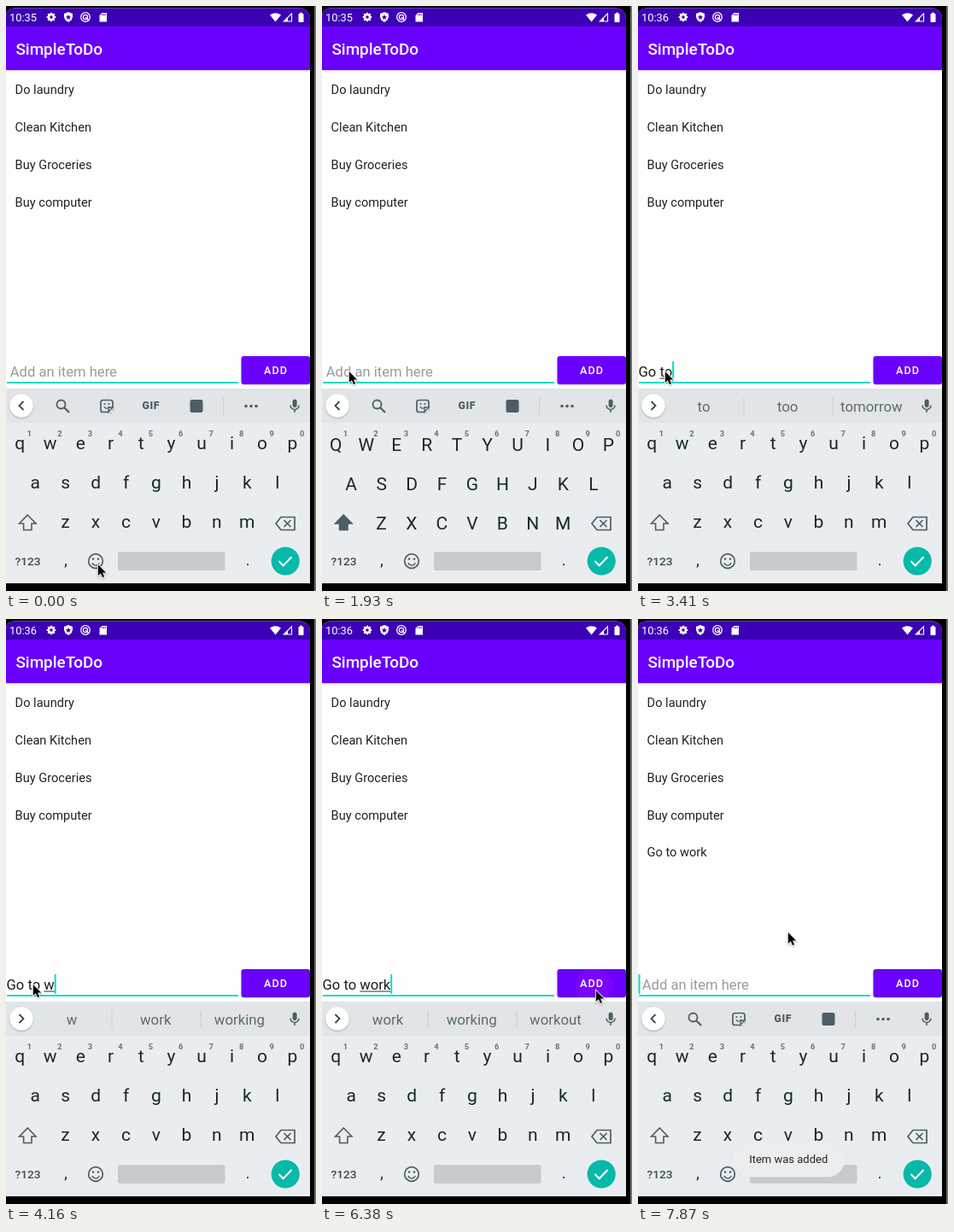
These frames come from a looping animation (363x685 px, 8000 ms). An HTML page with a canvas:

```html
<!DOCTYPE html>
<html lang="en">
<head>
<meta charset="utf-8">
<title>To-do list</title>
<style>
html, body { margin: 0; width: 100%; height: 100%; overflow: hidden; background: #000; }
canvas { display: block; width: 363px; height: 685px; }
</style>
</head>
<body>
<canvas id="stage"></canvas>
<script>
const W = 363, H = 685, LOOP = 8000, TICK = 148.5;
const canvas = document.getElementById('stage');
const dpr = window.devicePixelRatio || 1;
canvas.width = W * dpr;
canvas.height = H * dpr;
const ctx = canvas.getContext('2d');

const PURPLE = '#6900fe', TEAL = '#0fdac8', ICON = '#4d5d65', INK = '#17282f';
const ITEMS = ['Do laundry', 'Clean Kitchen', 'Buy Groceries', 'Buy computer'];

// [tick, typed text, start of the underlined word, suggestions]
const TYPING = [
  [0, '', 0, null],
  [14, 'G', 0, 'G|Good|Go'],
  [19, 'Go', 0, 'Go|Good|Going'],
  [21, 'Go ', 3, 'to|back|for'],
  [23, 'Go to', 3, 'to|too|tomorrow'],
  [24, 'Go to ', 6, 'the|bed|sleep'],
  [28, 'Go to w', 6, 'w|work|working'],
  [32, 'Go to wo', 6, 'wo|work|working'],
  [34, 'Go to wor', 6, 'wor|work|working'],
  [36, 'Go to work', 6, 'work|working|workout'],
  [45, '', 0, 'work|working|workout'],
  [46, '', 0, '||'],
  [47, '', 0, null]
];
// Ticks at which the caret flips, hidden at first
const BLINKS = [3, 6, 9, 13, 14, 17, 19, 27, 28, 31, 32, 39, 42, 48, 50];
// Pointer stops: [tick, x, y]
const POINTER = [
  [0, 107, 653], [5, 31, 427], [37, 31, 427], [40, 300, 432], [41, 348, 432],
  [42, 326, 434], [43, 320, 434], [51, 320, 434], [53, 175, 366]
];

function text(s, x, y, size, color, { weight = 400, align = 'left', spacing = 0 } = {}) {
  ctx.font = `${weight} ${size}px Roboto, sans-serif`;
  ctx.textAlign = align;
  ctx.letterSpacing = spacing + 'px';
  ctx.fillStyle = color;
  ctx.fillText(s, x, y);
}

function rect(x, y, w, h, color, radius = 0) {
  ctx.fillStyle = color;
  ctx.beginPath();
  ctx.roundRect(x, y, w, h, radius);
  ctx.fill();
}

function disc(x, y, r, color) {
  ctx.fillStyle = color;
  ctx.beginPath();
  ctx.arc(x, y, r, 0, 7);
  ctx.fill();
}

function ring(x, y, r, color, width, from = 0, to = 2 * Math.PI) {
  ctx.strokeStyle = color;
  ctx.lineWidth = width;
  ctx.beginPath();
  ctx.arc(x, y, r, from, to);
  ctx.stroke();
}

function trace(points, closed) {
  ctx.beginPath();
  for (let i = 0; i < points.length; i += 2) ctx.lineTo(points[i], points[i + 1]);
  if (closed) ctx.closePath();
}

function line(points, color, width, closed = false) {
  trace(points, closed);
  ctx.strokeStyle = color;
  ctx.lineWidth = width;
  ctx.stroke();
}

function poly(points, color) {
  trace(points, true);
  ctx.fillStyle = color;
  ctx.fill();
}

function shadow(color, blur, dy, draw) {
  ctx.save();
  ctx.shadowColor = color;
  ctx.shadowBlur = blur * dpr;
  ctx.shadowOffsetY = dy * dpr;
  draw();
  ctx.restore();
}

function statusBar(k) {
  const bar = '#3d00b6', white = '#fff';
  rect(0, 1, 356, 23, bar);
  text(k < 20 ? '10:35' : '10:36', 4, 18, 12.9, white);
  // gear
  for (let i = 0; i < 4; i++) {
    const a = i * Math.PI / 4, c = 5.3 * Math.cos(a), s = 5.3 * Math.sin(a);
    line([53 - c, 13 - s, 53 + c, 13 + s], white, 2.2);
  }
  disc(53, 13, 4.2, white);
  disc(53, 13, 1.8, bar);
  // shield
  poly([73, 7, 78, 9, 78, 13, 76.5, 16.5, 73, 19, 69.5, 16.5, 68, 13, 68, 9], white);
  poly([73, 10, 74, 12, 76, 12.3, 74.5, 13.7, 75, 16, 73, 14.8, 71, 16, 71.5, 13.7, 70, 12.3, 72, 12], bar);
  // sync circle
  ring(93, 13, 5.3, white, 1.3);
  ring(93, 13, 2.6, white, 1.2);
  line([93, 13, 97, 17], white, 1.3);
  // memory card
  poly([112.5, 8, 118, 8, 118, 18.5, 109.5, 18.5, 109.5, 11], white);
  for (let i = 0; i < 3; i++) rect(112.2 + i * 1.8, 9.3, 0.9, 2, bar);
  // wifi, signal, battery
  ctx.fillStyle = white;
  ctx.beginPath();
  ctx.moveTo(315.5, 18.5);
  ctx.lineTo(309, 10.5);
  ctx.quadraticCurveTo(315.5, 5.8, 322, 10.5);
  ctx.fill();
  line([334.5, 8.8, 334.5, 18, 325.3, 18], white, 1.1, true);
  poly([330, 13.3, 330, 18, 325.3, 18], white);
  rect(342.5, 9, 6, 10, white, 0.8);
  rect(344, 7.7, 3, 2, white);
}

function list(k) {
  ITEMS.forEach((s, i) => text(s, 10.6, 102.7 + 44 * i, 14.6, '#222'));
  if (k >= 46) text('Go to work', 10.6, 278.3, 14.6, k > 46 ? '#222' : '#4a4a4a');
}

function input(k, typed, start) {
  const x = 0.5, size = 16.6;
  rect(1, 440, 271, 2, TEAL);
  if (!typed) text('Add an item here', 4.8, 434, size, '#9b9b9b');
  text(typed, x, 434, size, '#1c1c1c');
  const end = x + ctx.measureText(typed).width;
  const from = x + ctx.measureText(typed.slice(0, start)).width;
  if (end - from > 1) rect(from, 435.4, end - from, 1.1, '#333');
  if (BLINKS.filter(b => b <= k).length % 2) rect(end, 416, 2, 23, TEAL);
}

function button(k) {
  shadow('rgba(0,0,0,.2)', 2, 1, () => rect(275.5, 410, 80.5, 33, PURPLE, 3));
  if (k >= 43 && k < 48) {
    ctx.save();
    ctx.beginPath();
    ctx.roundRect(275.5, 410, 80.5, 33, 3);
    ctx.clip();
    disc(319, 430, 22 + (k - 43) * 20, k < 47 ? '#7a04ff' : '#7102ff');
    ctx.restore();
  }
  text('ADD', 302, 431.3, 12.6, '#fff', { weight: 500, spacing: 1.1 });
}

function tools() {
  ring(64.5, 466.5, 5, ICON, 1.8);
  line([68, 470, 74, 476], ICON, 2.2);
  // sticker
  ctx.beginPath();
  ctx.roundRect(111, 461.5, 14, 14, 2.5);
  ctx.strokeStyle = ICON;
  ctx.lineWidth = 1.7;
  ctx.stroke();
  poly([125.5, 470, 119.5, 476, 125.5, 476], '#e1e5e8');
  line([125, 470, 120, 470, 120, 475.3], ICON, 1.3, true);
  disc(115.5, 466, 1.1, ICON);
  disc(120.5, 466, 1.1, ICON);
  ring(118, 468, 3.2, ICON, 1.2, 0.3, 2.8);
  text('GIF', 169.8, 472.4, 12.2, ICON, { weight: 800, align: 'center', spacing: 0.6 });
  rect(215.5, 461, 15, 15, ICON, 2);
  rect(254, 458, 1, 21, '#ccd1d5');
  for (let i = -1; i < 2; i++) disc(287 + i * 6, 468.5, 1.8, ICON);
}

function suggestions(words) {
  words.forEach((w, i) => text(w, 77 + 98.2 * i, 475, 16.8, '#5b6a71', { align: 'center' }));
  if (words[0]) for (const x of [123.5, 227.5]) rect(x, 458, 1, 21, '#c9cfd3');
}

function strip(words) {
  rect(0, 448, 356, 41, '#e1e5e8');
  shadow('rgba(0,0,0,.25)', 2, 1, () => disc(18, 468, 13.7, '#fff'));
  const d = words ? 1 : -1;
  line([18 - 2.5 * d, 463, 18 + 2.5 * d, 468, 18 - 2.5 * d, 473], '#37474f', 1.8);
  if (words) suggestions(words.split('|'));
  else tools();
  // microphone
  rect(335.6, 460.5, 5, 9.5, ICON, 2.5);
  ring(338, 467.5, 5, ICON, 1.5, 0, Math.PI);
  line([338, 472.5, 338, 476], ICON, 1.6);
}

function keys(upper) {
  rect(0, 488, 356, 188, '#e9edf0');
  const rows = [['qwertyuiop', 16.3], ['asdfghjkl', 34.2], ['zxcvbnm', 69.5]];
  rows.forEach(([letters, x0], r) => [...letters].forEach((c, i) => {
    const x = x0 + 35.45 * i;
    text(upper ? c.toUpperCase() : c, x, (upper ? 521 : 518.6) + 46 * r, 21, INK, { align: 'center' });
    if (!r) text((i + 1) % 10, x + 11.2, 504.3, 9.3, '#66747b', { weight: 700, align: 'center' });
  }));
  const shift = [25.3, 596, 35, 606, 30, 606, 30, 613.5, 20.6, 613.5, 20.6, 606, 15.6, 606];
  if (upper) poly(shift, ICON);
  line(shift, ICON, 1.6, true);
  line([316, 606, 322, 598.5, 338, 598.5, 338, 613.5, 322, 613.5], ICON, 1.7, true);
  line([325.5, 602, 333.5, 610], ICON, 1.7);
  line([333.5, 602, 325.5, 610], ICON, 1.7);
  text('?123', 25.5, 655, 13.7, '#3c4b52', { weight: 500, align: 'center' });
  text(',', 70, 655, 18, INK, { align: 'center' });
  text('.', 283, 655, 18, INK, { align: 'center' });
  // emoji
  ring(105, 650, 8.3, ICON, 1.7);
  disc(102, 647.5, 1.3, ICON);
  disc(108, 647.5, 1.3, ICON);
  ring(105, 650.5, 4.4, ICON, 1.5, 0.35, Math.PI - 0.35);
  rect(131, 639.3, 125.5, 21.7, '#c6cbcf', 2);
  disc(327.2, 650, 16.6, '#07b9a9');
  line([319.5, 650, 324.7, 655.2, 334.5, 645], '#fff', 2.1);
}

function toast(k) {
  if (k < 46) return;
  ctx.save();
  ctx.globalAlpha = [0.35, 0.85][k - 46] || 1;
  shadow('rgba(0,0,0,.05)', 3, 0, () => rect(109.5, 611, 133, 42.5, '#ecedee', 21));
  text('Item was added', 176.2, 637, 13, '#262626', { align: 'center' });
  ctx.restore();
}

function pointer(k) {
  const n = POINTER.findIndex(p => p[0] > k);
  const b = POINTER[n < 0 ? POINTER.length - 1 : n];
  const a = n < 0 ? b : POINTER[n - 1];
  const u = a === b ? 0 : (k - a[0]) / (b[0] - a[0]);
  const ease = u * u * (3 - 2 * u);
  const x = a[1] + (b[1] - a[1]) * ease, y = a[2] + (b[2] - a[2]) * ease;
  ctx.save();
  ctx.translate(x + 0.8, y + 0.6);
  ctx.scale(0.9, 0.9);
  const arrow = [0, 0.5, 0, 15, 3.4, 11.9, 5.7, 17.2, 8.1, 16.2, 5.9, 11, 10.4, 11];
  shadow('rgba(0,0,0,.3)', 2, 1, () => line(arrow, '#fff', 1.9, true));
  poly(arrow, '#000');
  ctx.restore();
}

function draw(t) {
  const k = Math.floor((t + 5) / TICK);
  const [, typed, start, words] = TYPING.filter(e => e[0] <= k).pop();
  ctx.setTransform(dpr, 0, 0, dpr, 0, 0);
  rect(0, 0, W, H, '#000');
  rect(361, 0, 2, H, '#6e6e6e');
  ctx.save();
  ctx.beginPath();
  ctx.roundRect(0, 2.5, 356, 673.5, [9, 12, 0, 0]);
  ctx.clip();
  rect(0, 0, 356, 676, '#fefefe');
  shadow('rgba(0,0,0,.2)', 3, 1, () => rect(0, 24, 356, 51, PURPLE));
  statusBar(k);
  text('SimpleToDo', 11.4, 57, 18.9, '#fff', { weight: 500 });
  list(k);
  input(k, typed, start);
  button(k);
  strip(words);
  keys(k === 13);
  toast(k);
  ctx.restore();
  pointer(k);
}

function loop() {
  draw(performance.now() % LOOP);
  requestAnimationFrame(loop);
}
loop();
</script>
</body>
</html>
```
